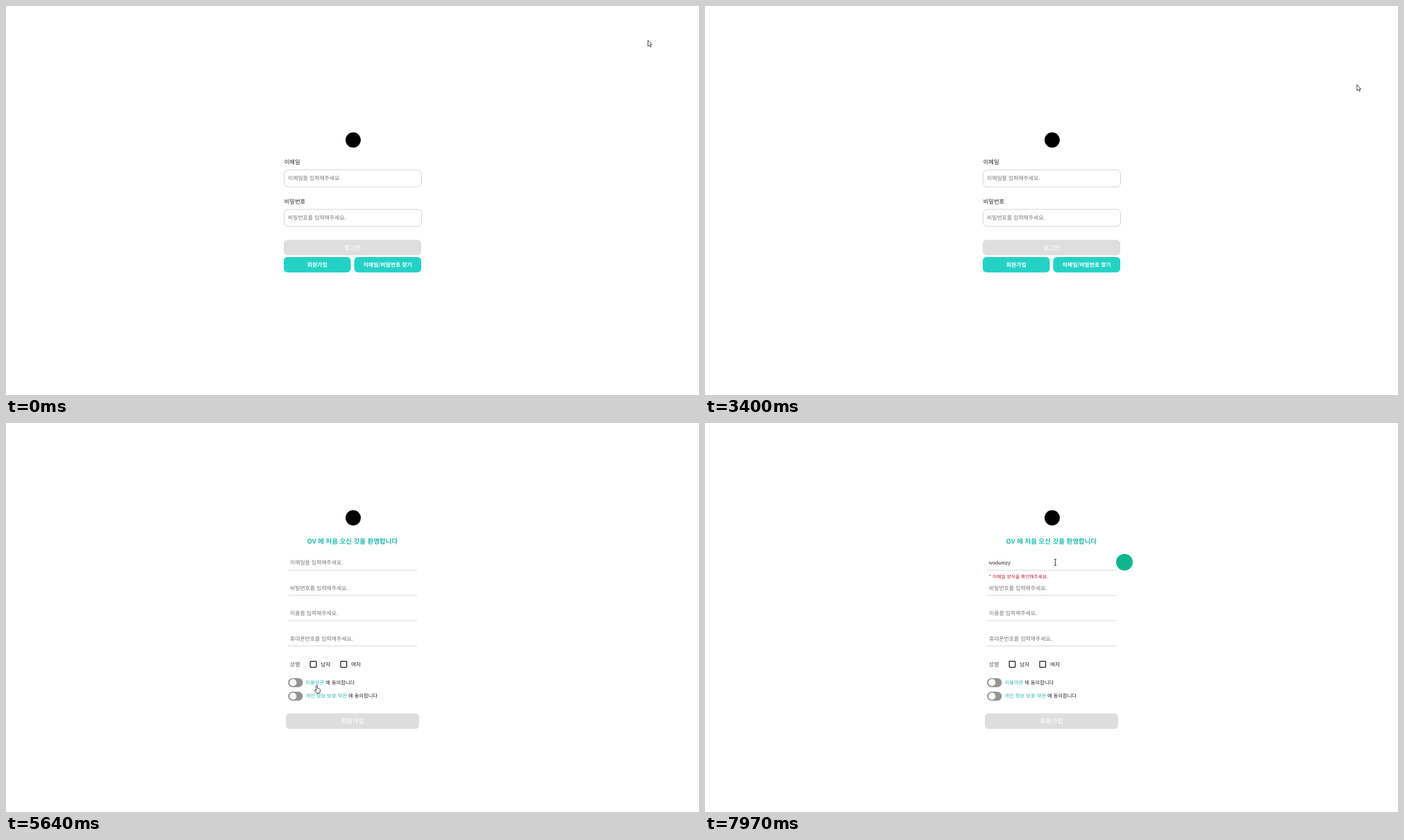
Recreate the animation shown at these times as an HTML page. Size 998x561 px, loop 8 s.

```html
<!DOCTYPE html>
<html lang="ko">
<head>
<meta charset="utf-8">
<style>
html, body { margin: 0; width: 100%; height: 100%; overflow: hidden; background: #fff; }
svg { display: block; width: 998px; height: 561px; }
text { font-family: "Noto Sans CJK KR", "Noto Sans CJK", sans-serif; text-rendering: geometricPrecision; white-space: pre; }
text, #live, #cursor { pointer-events: none; }
[data-cursor] { pointer-events: all; }
#typed { font-family: "Liberation Sans", Arial, sans-serif; }
</style>
</head>
<body>
<svg viewBox="0 0 998 561">
  <g id="login"></g>
  <g id="signup"></g>
  <g id="live">
    <circle id="badge" cx="604" cy="200.7" fill="#0fb68b"/>
    <text id="typed" x="409" y="204" font-size="7.3" fill="#222"></text>
    <path id="caret" d="M0 197V206" stroke="#111" stroke-width=".7"/>
  </g>
  <g id="cursor" stroke="#222" stroke-width=".8" fill="#fff" stroke-linejoin="round">
    <path id="arrow" d="M0 0V8.5L2 6.8L3.4 9.7L4.7 9.1L3.4 6.2H5.8Z"/>
    <path id="hand" d="M-1 1Q0 -1 1 1V4.8L4.2 5.7Q5.4 6.2 5.1 8L4.2 12H-.4L-3 8.2Q-3.3 6.3 -1 7.8Z"/>
    <path id="beam" d="M-1.7 -4.3H1.7M0 -4.3V4.3M-1.7 4.3H1.7" fill="none"/>
  </g>
</svg>
<script>
const $ = id => document.getElementById(id);
const TEAL = '#24d2c5', LINK = '#22b8ae', GREY = '#dedede', HINT = '#777', INK = '#222';

// y is the visual middle of the line
const text = (x, y, size, fill, str, attrs = '') =>
  `<text x="${x}" y="${y + size * .38}" font-size="${size}" fill="${fill}" ${attrs}>${str}</text>`;
const rect = (x, y, w, h, r, attrs) =>
  `<rect x="${x}" y="${y}" width="${w}" height="${h}" rx="${r}" ${attrs}/>`;
const logo = y => `<circle cx="500" cy="${y}" r="11"/>`;

const button = (x, y, w, size, str, active) =>
  rect(x, y, w, 22.2, 5.5, active ? `fill="${TEAL}" data-cursor="hand"` : `fill="${GREY}"`) +
  text(x + w / 2, y + 11.2, size, active ? '#fff' : '#f8f8f8', str, 'font-weight="700" text-anchor="middle"');

const field = (y, label, hint) =>
  text(400.7, y - 10.7, 8.3, INK, label) +
  rect(400.5, y + .3, 198, 24.6, 6, 'fill="#fff" stroke="#ccc" stroke-width=".8" data-cursor="beam"') +
  text(406, y + 12.5, 7.84, HINT, hint);

const line = (name, i) => {
  const y = 212.3 + 36.37 * i;
  return rect(406, y - 22, 186, 22, 0, 'fill="none" data-cursor="beam"') +
    text(409, y - 10.8, 7.84, HINT, name + ' 입력해주세요.', `id="hint${i}"`) +
    `<path d="M406 ${y}H592" stroke="#d0d0d0" stroke-width=".8"/>`;
};
const check = (x, str) =>
  rect(x, 343.7, 8.6, 8.6, .8, `fill="none" stroke="${INK}" stroke-width="1.25"`) +
  text(x + 15, 347.8, 7.7, INK, str);
const toggle = (y, str) =>
  rect(406.2, y - 6.5, 21.3, 13, 6.5, 'fill="#949494"') +
  `<circle cx="413.3" cy="${y}" r="5.1" fill="#fff"/>` +
  text(431.5, y - .5, 7.26, INK, `<tspan fill="${LINK}" data-cursor="hand">${str}</tspan> 에 동의합니다`);

$('login').innerHTML = logo(193.3) +
  field(236, '이메일', '이메일을 입력해주세요.') +
  field(293, '비밀번호', '비밀번호를 입력해주세요.') +
  button(400, 337.2, 198, 8.7, '로그인') +
  button(400, 362, 96.5, 7.88, '회원가입', true) +
  button(501.5, 362, 96.5, 7.8, '이메일/비밀번호 찾기', true);

$('signup').innerHTML = logo(136.8) +
  text(564, 170.2, 9.45, LINK, 'OV 에 처음 오신 것을 환영합니다', 'font-weight="700" text-anchor="end"') +
  ['이메일을', '비밀번호를', '이름을', '휴대폰번호를'].map(line).join('') +
  text(408.5, 347.4, 8.2, '#666', '성별') + check(438.2, '남자') + check(482, '여자') +
  toggle(374.4, '이용약관') + toggle(394, '개인 정보 보호 약관') +
  button(403, 418.8, 192, 8.97, '회원가입') +
  text(409, 221.8, 6.74, '#bc1436', '* 이메일 양식을 확인해주세요.', 'id="error"');

const LOOP = 8000, SWITCH = 5540, FOCUS = 6340, BLINK = 530;
const NAME = 'ivodumzy', FIRST_KEY = 6560, KEY_GAP = 125;

// pointer moves: start, end, x, y and an optional bend point
const HOME = [924.5, 49.5];
const MOVES = [
  [30, 730, 656.5, 260],
  [900, 1070, 678.7, 258.3],
  [1940, 2320, 260, 8],
  [2320, 2740, 839, 99.5, 500, -12],
  [2740, 2900, 970, 120],
  [3040, 3400, 938.8, 113.5],
  [3400, 3700, 949, 106.5],
  [4040, 4240, 729.5, 215.5],
  [4499, 4500, 655.5, 293.5],
  [4640, 4940, 385, 404],
  [4940, 5140, 447.5, 377.7],
  [5910, 6270, 468, 201.3],
  [6420, 6560, 504.5, 201]
];

const clamp = v => Math.min(1, Math.max(0, v));

function pointer(t) {
  let [x, y] = HOME;
  for (const [t0, t1, tx, ty, bx = (x + tx) / 2, by = (y + ty) / 2] of MOVES) {
    const k = clamp((t - t0) / (t1 - t0));
    const curve = (a, b, c) => (1 - k) ** 2 * a + 2 * k * (1 - k) * b + k * k * c;
    [x, y] = [curve(x, bx, tx), curve(y, by, ty)];
    if (k < 1) break;
  }
  return [x, y];
}

const show = (id, on) => $(id).style.display = on ? '' : 'none';

function draw(t) {
  const signup = t >= SWITCH;
  const count = Math.min(NAME.length, Math.max(0, Math.floor((t - FIRST_KEY) / KEY_GAP) + 1));
  show('login', !signup);
  show('signup', signup);
  show('live', t >= FOCUS);
  show('hint0', !count);
  show('error', count);

  $('typed').textContent = NAME.slice(0, count);
  const lastInput = count ? FIRST_KEY + (count - 1) * KEY_GAP : FOCUS;
  show('caret', Math.floor((t - lastInput) / BLINK) % 2 === 0);
  const width = count ? $('typed').getComputedTextLength() : 0;
  $('caret').setAttribute('transform', `translate(${409.4 + width} 0)`);
  $('badge').setAttribute('r', 12 * clamp((t - FOCUS) / 210));

  const [x, y] = pointer(t);
  const kind = document.elementFromPoint(x, y)?.dataset.cursor || 'arrow';
  for (const id of ['arrow', 'hand', 'beam']) show(id, id === kind);
  $('cursor').setAttribute('transform', `translate(${x} ${y})`);
}

const start = performance.now();
(function tick() {
  draw((performance.now() - start) % LOOP);
  requestAnimationFrame(tick);
})();
</script>
</body>
</html>
```
